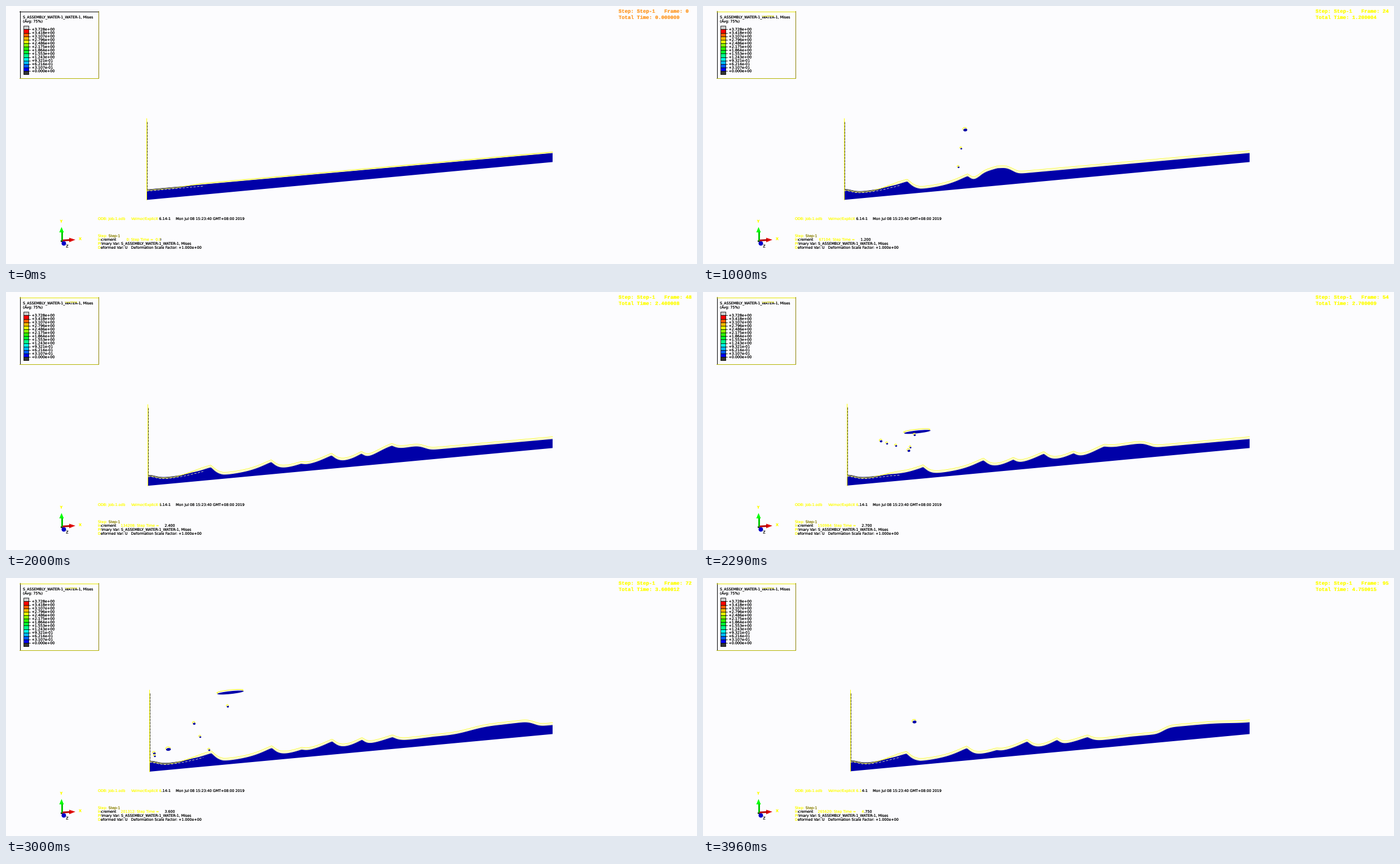
A matplotlib script that plays this animation: 1225x457 px, repeating every 4 s.

```python
import colorsys
import random
import numpy as np
import matplotlib.pyplot as plt
from matplotlib.animation import FuncAnimation
from matplotlib.patches import Circle, Ellipse, Polygon, Rectangle
from matplotlib.patheffects import Normal
from matplotlib.transforms import Bbox

W, H, DPI = 1225, 457, 64
PX = 72 / DPI                      # points per pixel
LOOP, TICK, STEPS = 4000, 20, 96
BG, YELLOW, OLIVE, WATER = "#fcfcfe", "#ffff00", "#8a8000", "#0000a8"
RIGHT = 969                        # fixed end wall

fig = plt.figure(figsize=(W / DPI, H / DPI), dpi=DPI, facecolor=BG)
ax = fig.add_axes([0, 0, 1, 1])
ax.set_xlim(0, W)
ax.set_ylim(H, 0)
ax.axis("off")


def label(x, y, s, color="black", size=6.35, font="DejaVu Sans", **kw):
    # two passes keep the tiny strokes dark
    return ax.text(x, y, s, color=color, fontsize=size * PX, family=font,
                   va="baseline", path_effects=[Normal(), Normal()], **kw)


def clip(text, x0, x1, top=0, bottom=H):
    text.set_clip_on(True)
    text.set_clip_box(Bbox([[x0, H - bottom], [x1, H - top]]))
    return text


def line(xs, ys, color, width=1.0, **kw):
    return ax.plot(xs, ys, color=color, lw=width * PX, **kw)[0]


# --- wave tank -------------------------------------------------------------

def floor(x):
    return 343.4 - 0.0932 * (np.asarray(x, float) - 250)


def paddle(step):
    return 264 - 14.5 * np.cos(5 * 0.05 * step)


def bump(x, centre, height, back, front, power):
    d = np.abs(x - centre) / np.where(x < centre, back, front)
    return height * np.exp(-d ** power)


def front_at(step):
    return 250 + 12.5 * min(step, 24) + 8.1 * max(step - 24, 0)


def bore(step, x):
    """First big wave: a plateau that stretches as it runs."""
    height = np.interp(step, [0, 24, 48], [0, 15, 10])
    back = 30 + 1.2 * max(step - 24, 0)
    return bump(x, front_at(step) - 35, height, back, 35, 4)


def train(step, x):
    """Evenly spaced cusps behind the bore, with smaller ones in between."""
    total = np.zeros_like(x)
    for n in range(-2, 6):
        c = 577 + 4.5 * (step - 48) - 107 * n
        main = np.interp(c, [300, 365, 640, 760], [0, 14, 13, 0])
        small = np.interp(c + 53, [500, 565, 640, 720], [0, 10, 9, 0])
        total += bump(x, c, main, 30, 11, 1.3)
        total += bump(x, c + 53, small, 20, 8, 1.3)
    return total


def depth(step, x):
    x = np.asarray(x, float)
    calm = 18.5 - 0.0035 * (x - 250)
    drawn = np.interp(x, [250, 330, 385, 600, 760], [12, 12, 6, 10, 15])
    behind = np.clip((front_at(step) - x) / 60, 0, 1)
    pile = bump(x, paddle(step), 7 * min(1, step / 24), 18, 18, 2)
    return (calm * (1 - behind) + (drawn + train(step, x)) * behind + pile
            + bore(step, x) + bore(step, 2 * RIGHT - x))


def surface(step, x):
    return floor(x) - depth(step, x)


# --- legend ----------------------------------------------------------------

line([24.5, 24.5], [9, 127], "black")
top_edge = line([24, 164], [9.5, 9.5], "black")
line([163.5, 163.5], [9, 127], OLIVE)
line([24, 164], [127.5, 127.5], "#b4b400")
title = "S_ASSEMBLY_WATER-1_WATER-1, Mises"
label(30, 22, title)
title_fade = clip(label(30, 22, title, YELLOW), 103, 130, 14, 18.6)
label(30, 29.3, "(Avg: 75%)")

hues = [colorsys.hsv_to_rgb(i * 2 / 33, 1, 1) for i in range(12)]
ROW, PEAK = 6.15, 3.7283
for i, color in enumerate(["#cccccc", *hues, "#333333"]):
    ax.add_patch(Rectangle((30.5, 35.2 + i * ROW), 9, ROW, fc=color,
                           ec="black", lw=0.8 * PX))
for i in range(13):
    y = 35.2 + (i + 1) * ROW
    line([39, 43], [y, y], "black", 0.8)
    label(45.5, y + 2.1, f"{PEAK * (12 - i) / 12:+.3e}")

# --- axis triad ------------------------------------------------------------

line([98.5, 98.5], [416, 400], "#00c800", 3, solid_capstyle="butt")
ax.add_patch(Polygon([(94.5, 401), (102.5, 401), (98.5, 391.5)], fc="#00ff00"))
line([100, 114], [415.3, 414.5], "#b40000", 3, solid_capstyle="butt")
ax.add_patch(Polygon([(112, 410.5), (112, 418.5), (123, 414)], fc="#e01010"))
ax.add_patch(Rectangle((96.5, 414.5), 4, 3.5, fc="#202020"))
ax.add_patch(Circle((102.5, 420.5), 4, fc="#0000c8"))
label(98, 383.5, "Y", YELLOW, ha="center", weight="bold")
label(131.5, 414.5, "X", YELLOW, ha="center", weight="bold")
label(108.5, 427.5, "Z", ha="center")

# --- captions --------------------------------------------------------------

head = [label(1086, y, "", YELLOW, 9, "Liberation Mono", weight="bold")
        for y in (12, 23)]

caption = [(163, "ODB: Job-1.odb"), (222, "Velmor/Explicit 6.14-1"),
           (301, "Mon Jul 08 15:23:40 GMT+08:00 2019")]
cap_lit = [label(x, 379, s, YELLOW) for x, s in caption]
cap_dark = [label(x, 379, s) for x, s in caption]

clip(label(163, 409.3, "Step: Step-1", YELLOW), 160, 182)
clip(label(163, 409.3, "Step: Step-1", OLIVE), 182, 220)
for y, s in ((423, "Primary Var: S_ASSEMBLY_WATER-1_WATER-1, Mises"),
             (430, "Deformed Var: U   Deformation Scale Factor: +1.000e+00")):
    clip(label(163, y, s, YELLOW), 160, 167.5)
    clip(label(163, y, s), 167.5, 400)

counter = [label(163, 415.8, "", c)
           for c in (YELLOW, "black", YELLOW, "black")]

# --- moving parts ----------------------------------------------------------

wall = line([], [], YELLOW, 1)
wall_dark = line([], [], "#303030", 0.9, dashes=(5, 1.2))
water = ax.add_patch(Polygon([(0, 0)] * 3, fc=WATER, ec="none"))
crest = line([], [], YELLOW, 0.8)
rim = line([], [], YELLOW, 0.5)
inner = line([], [], "#ffffc0", 0.8, dashes=(5, 3))


class Drop:
    """Ballistic drop; x is its place halfway through the flight."""

    def __init__(self, launch, x, speed, width):
        self.launch, self.x, self.speed = launch, x, speed
        size = dict(width=width, height=min(5, 0.8 * width), angle=-6)
        self.halo = ax.add_patch(Ellipse((0, 0), **size, fc="none",
                                         ec=YELLOW, lw=PX))
        self.blob = ax.add_patch(Ellipse((0, 0), **size, fc=WATER))

    def draw(self, step):
        t = step - self.launch
        x = self.x + t - 13
        y = floor(x) - 14 - self.speed * t + t * t / 2
        seen = t > 0 and y < surface(step, x) - 1 and x > paddle(step)
        self.blob.set_center((x, y))
        self.halo.set_center((x - 1, y - 2))
        self.blob.set_visible(seen)
        self.halo.set_visible(seen)


def splash(launch, x, count, speed, width):
    """The fastest drop leads; slower, smaller ones trail to its left."""
    drops = [Drop(launch, x, speed, width)]
    for i in range(1, count):
        drops.append(Drop(launch, x - rng.uniform(0, 10 * count),
                          speed - 7.5 * i / count, rng.uniform(3, 5)))
    return drops


rng = random.Random(4)
drops = (splash(11, 465, 3, 13.4, 7) + splash(49, 388, 7, 16.4, 47)
         + splash(70, 299, 3, 12.1, 8.5) + splash(84, 377, 1, 11.2, 7))


def draw_water(step):
    p = paddle(step)
    x = np.linspace(p, RIGHT, 1400)
    y = surface(step, x)
    water.set_xy(np.vstack([np.c_[x, y], (RIGHT, floor(RIGHT)),
                            (p, floor(p))]))
    shift = np.interp(x, [300, 345], [2, -4 if step else -2])
    crest.set_data(x, y + shift)
    rim.set_data(x, y + 0.3 * shift)
    left = x < 350
    inner.set_data(x[left], y[left] + 3)

    top = 199 - 0.0932 * (p - 249)
    wall.set_data([p - 0.5] * 2, [top, floor(p)])
    wall_dark.set_data([p + 0.5] * 2, [top + 6, surface(step, p)])
    wall_dark.set_visible(p < 272)


def draw_text(step):
    now = step * 0.05
    head[0].set_text(f"Step: Step-1   Frame: {step}")
    head[1].set_text(f"Total Time: {now + step // 6 * 1e-6:.6f}")
    for t in head:
        t.set_color(YELLOW if step else "#ff9a28")
    top_edge.set_color("#e6e600" if step else "black")
    title_fade.set_visible(step >= 14)

    # captions are lit up to a point that follows the paddle
    split = paddle(step) + 21
    for lit, dark in zip(cap_lit, cap_dark):
        clip(lit, 160, split)
        clip(dark, split, 440)

    count = str(2796 * step)
    value = f"     {now:.3f}" if step else "  0.0"
    pad = " " * (10 - len(count))
    spans = [160, 167.5, 199, split + 3, 400]
    for t, a, b in zip(counter, spans, spans[1:]):
        t.set_text(f"Increment{pad}{count}: Step Time ={value}")
        clip(t, a, b)


def update(i):
    step = min(int((i * TICK + 5) * STEPS / LOOP), STEPS - 1)
    draw_water(step)
    draw_text(step)
    for drop in drops:
        drop.draw(step)
    return []


anim = FuncAnimation(fig, update, frames=LOOP // TICK, interval=TICK,
                     repeat=True, repeat_delay=0, blit=False)
plt.show()
```
